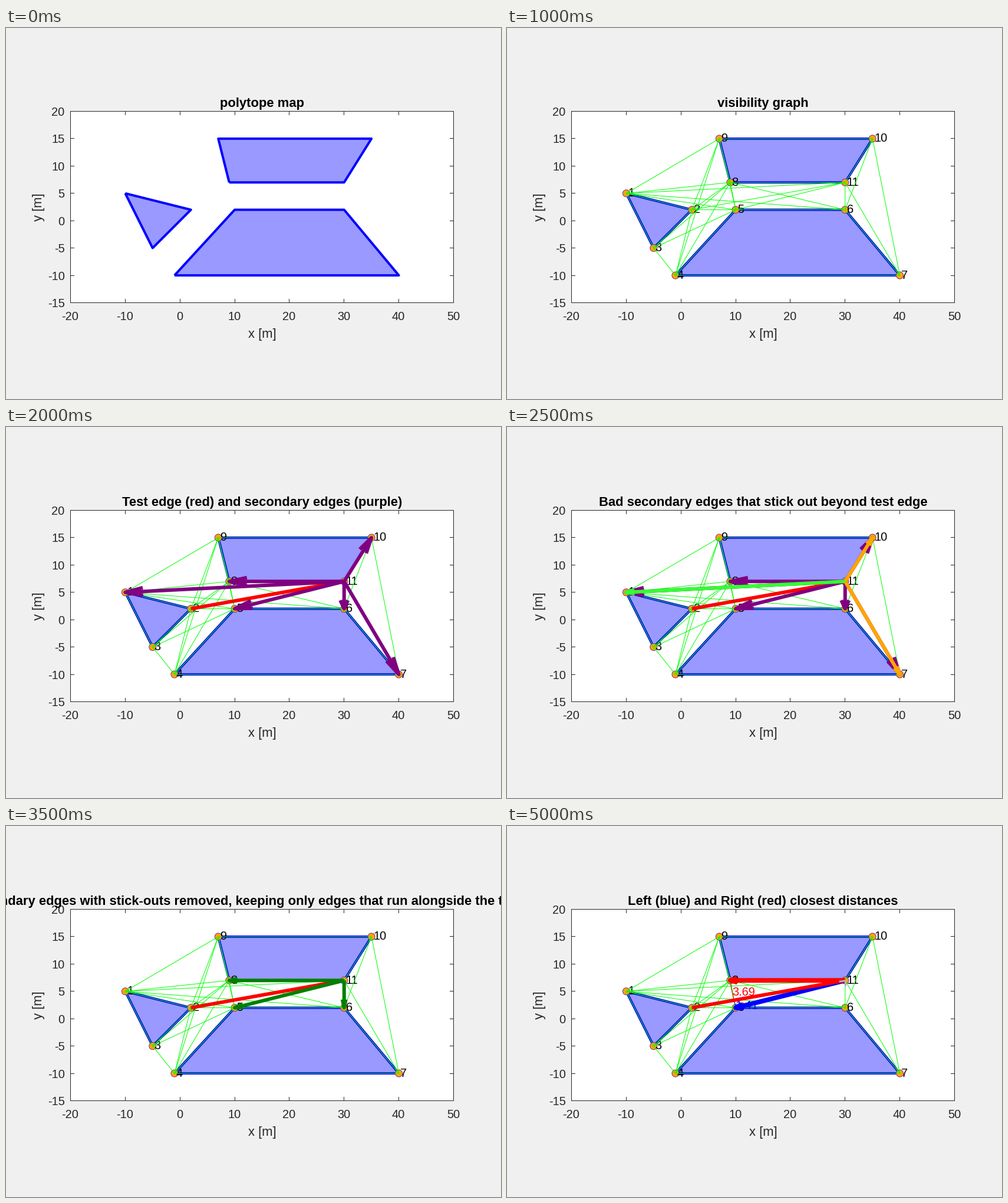
Write a matplotlib script that moves like this. It is 840x630 px and loops after 5500 ms.

```python
import numpy as np
import matplotlib.pyplot as plt
from matplotlib.animation import ArtistAnimation

plt.rcParams["font.family"] = "Liberation Sans"
W, H, DPI = 840, 630, 100
PX = 72 / DPI  # points per pixel
SCALE = 650 / 70
INK = (0.15, 0.15, 0.15)
BLUE, RED, ORANGE = (0, 0, 1), (1, 0, 0), (1, 0.647, 0)
GREEN, LIME, PURPLE = (0, 0.5, 0), (0.2, 1, 0.2), (0.5, 0, 0.5)

NODES = np.array([(-10, 5), (2, 2), (-5, -5), (-1, -10), (10, 2), (30, 2),
                  (40, -10), (9, 7), (7, 15), (35, 15), (30, 7)], float)
POLYGONS = [(1, 2, 3), (4, 5, 6, 7), (8, 9, 10, 11)]
VISIBLE = {1: (5, 6, 8, 9, 11), 2: (4, 5, 8, 9, 11), 3: (4, 5, 8),
           4: (8, 9), 5: (8, 9, 11), 6: (8, 10, 11), 7: (10, 11)}
START, END = 11, 2  # test edge

fig = plt.figure(figsize=(W / DPI, H / DPI), dpi=DPI, facecolor="#f0f0f0")
ax = fig.add_axes([0, 0, 1, 1])
ax.set(xlim=(0, W), ylim=(H, 0))
ax.axis("off")


def to_px(p):
    p = np.asarray(p, float)
    return np.stack([109.5 + (p[..., 0] + 20) * SCALE,
                     141.5 + (20 - p[..., 1]) * SCALE], axis=-1)


POS = dict(enumerate(to_px(NODES), 1))


def line(points, color, width, z, **kw):
    x, y = np.transpose(points)
    kw = {"solid_capstyle": "butt", "solid_joinstyle": "round", **kw}
    return ax.plot(x, y, color=color, lw=width * PX, zorder=z, snap=False, **kw)[0]


def text(x, y, s, size=20, color="k", z=5, **kw):
    kw = {"va": "baseline", **kw}
    return ax.text(x, y, s, fontsize=size * PX, color=color, zorder=z, **kw)


def title(s):
    return text(434.5, 134, s, 22, weight="bold", ha="center")


def edge(n, color, width=6, z=7):
    return line([POS[START], POS[n]], color, width, z)


def arrow(n, color, width=6, head=14, half=3, z=7):
    a, b = POS[START], POS[n]
    size = np.hypot(*(b - a))
    u = (b - a) / size
    side = np.array([-u[1], u[0]]) * half
    back = b - u * min(head, 0.31 * size)
    barbs = line([back + side, b, back - side], color, width, z)
    return [edge(n, color, width, z), barbs]


def arrows(nodes, color, **kw):
    return [part for n in nodes for part in arrow(n, color, **kw)]


def distance(n, color):
    """Perpendicular from a node to the test edge, with its length."""
    a, p = NODES[START - 1], NODES[n - 1]
    u = NODES[END - 1] - a
    u = u / np.hypot(*u)
    foot = a + u * np.dot(p - a, u)
    x, y = to_px((p + foot) / 2)
    gap = np.hypot(*(p - foot))
    return [line(to_px([p, foot]), color, 1, 6),
            text(x + 0.5, y + 8.5, f"{gap:.2f}", color=color, z=6)]


def draw_axes():
    x0, x1, y0, y1 = 109.5, 759.5, 141.5, 466.5
    ax.add_patch(plt.Rectangle((x0, y0), x1 - x0, y1 - y0, fc="w", ec="none",
                               zorder=0, snap=False))
    line([(x0, y0), (x1, y0), (x1, y1), (x0, y1), (x0, y0)], INK, 1, 1,
         solid_capstyle="projecting", solid_joinstyle="miter")
    for v in range(-20, 51, 10):
        x = np.floor(to_px((v, 0))[0]) + 0.5
        for y, d in ((y0, 6.5), (y1, -6.5)):
            line([(x, y), (x, y + d)], INK, 1, 1)
        text(x - 0.5, 496, str(v), color=INK, ha="center")
    for v in range(-15, 21, 5):
        y = np.floor(to_px((0, v))[1]) + 0.5
        for x, d in ((x0, 6.5), (x1, -6.5)):
            line([(x, y), (x + d, y)], INK, 1, 1)
        text(99.7, y + 7.5, str(v), color=INK, ha="right")
    text(434.5, 526, "x [m]", 22, INK, ha="center")
    text(61, 304, "y [m]", 22, INK, ha="center", rotation=90, rotation_mode="anchor")


def draw_map():
    for poly in POLYGONS:
        ring = [POS[n] for n in poly + poly[:1]]
        ax.add_patch(plt.Polygon(ring, fc=(0.6, 0.6, 1), ec="none", zorder=2))
        line(ring, BLUE, 4, 2)


draw_axes()
draw_map()

nodes = []
for n, (x, y) in POS.items():
    dot = plt.Circle((x, y), 6, fc=ORANGE, ec=(0.49, 0.18, 0.56), lw=PX, zorder=3)
    nodes += [ax.add_patch(dot), text(x + 2.8, y + 5.5, str(n), z=4)]

graph = [line([POS[a], POS[b]], (0, 1, 0), 1, 5) for a in VISIBLE for b in VISIBLE[a]]
graph += [line([POS[n] for n in p + p[:1]], (0, 1, 0), 1, 5) for p in POLYGONS]
graph += nodes

x, y = POS[START]
tail = line([(x - 10, y + 2), (x + 0.7, y + 0.3), (x + 0.7, y + 10)], (0.7, 0.7, 0.7), 3, 10)
test = edge(END, RED, z=7)
marked = graph + [test]
fan = [edge(n, GREEN, z=6) for n in (1, 5, 6, 7, 8, 10)]
vectors = arrows((1, 5, 6, 7, 8, 10), PURPLE, head=30, half=6.5, z=8)
bad = arrows((7, 10), ORANGE, z=9) + arrows((1,), LIME, z=9)
kept = arrows((5, 6, 8), GREEN, z=8)


def sided(nodes, color, z):
    parts = arrows(nodes, color, width=8, head=12, half=3, z=z)
    return parts + [p for n in nodes for p in distance(n, color)]


right, left, far_left = sided((8,), RED, 8), sided((5,), BLUE, 6), sided((6,), BLUE, 6)

scenes = [
    ("polytope map", []),
    ("polytope map with numbered nodes", nodes),
    ("visibility graph", graph),
    ("visibility graph, only from node 11", marked + fan + [tail]),
    ("Test edge (red) and secondary edges (purple)", marked + vectors),
    ("Bad secondary edges that stick out beyond test edge", marked + vectors + bad),
    ("Secondary edges with stick-outs removed", marked + kept),
    ("Secondary edges with stick-outs removed, keeping only edges that run alongside "
     "the test edge", marked + kept),
    ("Secondary edges to calculate distances", marked + kept),
    ("Left (blue) and Right (red) distances", marked + right + left + far_left + [tail]),
    ("Left (blue) and Right (red) closest distances", marked + right + left + [tail]),
]
frames = [[title(s)] + parts for s, parts in scenes]
anim = ArtistAnimation(fig, frames, interval=500, repeat=True, repeat_delay=0, blit=False)
plt.show()
```
